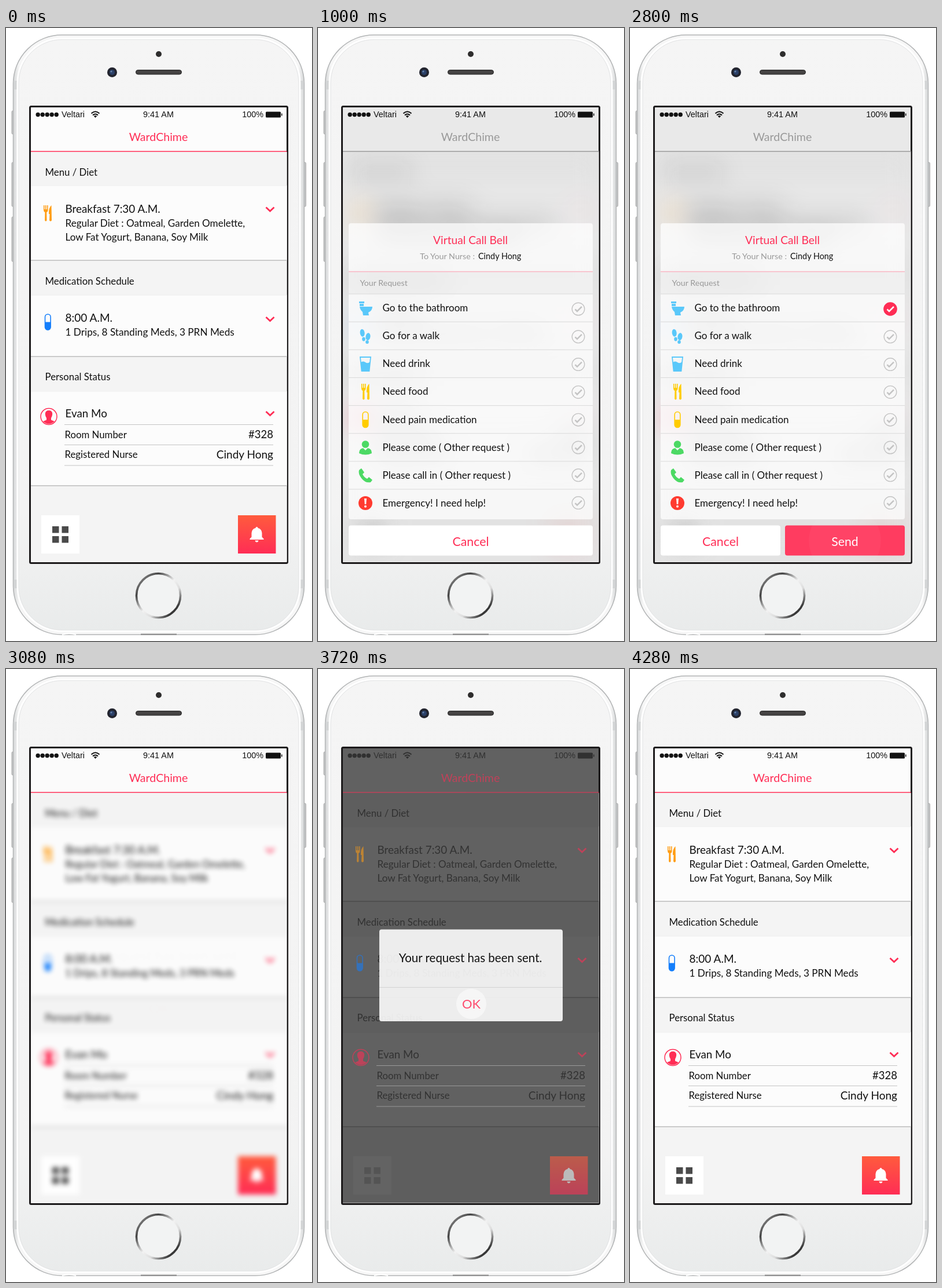
An HTML page that plays this animation: 529 px wide and 1058 px high, repeating every 4800 ms.

```html
<!DOCTYPE html>
<html lang="en">
<head>
<meta charset="utf-8">
<title>Call bell</title>
<style>
html, body { margin: 0; width: 100%; height: 100%; overflow: hidden; background: #fff; }
svg { display: block; width: 529px; height: 1058px; font-family: Lato, "Open Sans", sans-serif; }
.sys { font: 14.4px "Liberation Sans", Arial, sans-serif; }
.pink { color: #ff2d55; }
.line { fill: none; stroke: currentColor; }
</style>
</head>
<body>
<svg id="stage" viewBox="0 0 529 1058"></svg>
<script>
const NURSE = 'Cindy Hong';
const PINK = '#ff2d55', BLUE = '#5ac8fa', YELLOW = '#ffcc00', GREEN = '#4cd964';

const text = (x, y, size, str, fill = '#111', anchor = 'start') =>
  `<text x="${x}" y="${y}" font-size="${size}" fill="${fill}" text-anchor="${anchor}">${str}</text>`;
const rect = (x, y, w, h, fill, more = '') =>
  `<rect x="${x}" y="${y}" width="${w}" height="${h}" fill="${fill}" ${more}/>`;
const hline = (x1, x2, y, color, width = 1) =>
  `<path d="M${x1} ${y}H${x2}" stroke="${color}" stroke-width="${width}"/>`;
const place = (x, y, body, color = '#000') =>
  `<g transform="translate(${x} ${y})" color="${color}" fill="currentColor">${body}</g>`;

// Icons are centred on 0,0 and take the current colour.
const icon = {
  toilet: `<path d="M-11-12h9v3h-9zM-10-8h7v4h-7zM-10-3H12Q12 4 5 7l1 5H-4l-1-6Q-9 3-10-3z"/>`,
  feet: `<g><ellipse cx="-4.500" cy="-6.500" rx="4" ry="6.500" transform="rotate(-8)"/>
    <ellipse cx="-3" cy="5" rx="2.800" ry="3.400"/></g>
    <g><ellipse cx="4.500" cy="0" rx="4" ry="6.500" transform="rotate(8)"/>
    <ellipse cx="3" cy="10" rx="2.800" ry="3"/></g>`,
  glass: `<path class="line" stroke-width="1.800" d="M-9-12H9L6.500 12h-13z"/>
    <path d="M-8-3Q-4-6 0-3T8-4L6.500 12h-13z"/>`,
  cutlery: `<path d="M-7-14h1.600v7h1.400v-7h1.600v7h1.400v-7H.600v8Q.600-3-1.800-2L-1.500 12q-1.700 3-3.400 0l.300-14Q-7-3-7-6z"/>
    <path d="M6.500-14Q1.500-10 2 1h1.500L3 12q2 3 4 0z"/>`,
  pill: `<rect class="line" x="-4.800" y="-13.500" width="9.600" height="27" rx="4.800" stroke-width="1.600"/>
    <path d="M-5 0H5V9A5 5 0 0 1-5 9z"/>`,
  person: `<circle cy="-5.500" r="6.300"/><path d="M-11 10Q-11 2-4 1L0 5 4 1Q11 2 11 10 0 15-11 10z"/>`,
  phone: `<path d="M-11-9l4-3 5 7-3 3Q-2 4 3 6L6 3l6 5-3 4Q0 14-7 5-13-3-11-9z"/>`,
  alert: `<circle r="12"/><path d="M-2-8h4L1.200 2h-2.400z" fill="#fff"/><circle cy="5.800" r="2" fill="#fff"/>`,
  user: `<circle class="line" r="14" stroke-width="1.500"/>
    <path d="M0-10.500C8-10.500 7-2 4 2.500V6l6 2.500Q0 17-10 8.500L-4 6V2.500C-7-2-8-10.500 0-10.500z"/>`,
  bell: `<path d="M-12 9.500v-1.500l3-3V-2Q-8.500-9-2-10.500a2 2 0 0 1 4 0Q8.500-9 9 -2V5l3 3v1.500zM-3 11h6q-.500 3-3 3t-3-3z"/>`,
  chevron: `<path class="line" stroke-width="2.800" d="M-7-3.500L0 3 7-3.500"/>`,
  tick: `<path class="line" stroke-width="2.500" d="M-5.500.500L-2 4 6-4"/>`
};

const rows = [
  ['toilet', BLUE, 'Go to the bathroom'], ['feet', BLUE, 'Go for a walk'],
  ['glass', BLUE, 'Need drink'], ['cutlery', YELLOW, 'Need food'],
  ['pill', YELLOW, 'Need pain medication'], ['person', GREEN, 'Please come ( Other request )'],
  ['phone', GREEN, 'Please call in ( Other request )'], ['alert', '#ff3b30', 'Emergency! I need help!']
];

const sideKey = (x, y, h) => rect(x, y, 5, h, '#c9cbcc', 'rx="1.500" stroke="#999" stroke-width=".800"');
const phoneBody = `
  ${sideKey(10, 143, 40)}${sideKey(10, 232, 76)}${sideKey(10, 326, 77)}${sideKey(513.5, 232, 76)}
  ${rect(12.5, 12, 503, 1035, 'url(#rim)', 'rx="84" stroke="#b2b4b5" stroke-width="1.500"')}
  ${[91, 952].map(y => rect(13, y, 7, 15, '#d2d4d5') + rect(508, y, 7, 15, '#d2d4d5')).join('')}
  ${rect(20, 18, 488, 1023, 'url(#face)', 'rx="77" stroke="#fff" stroke-width="3"')}
  ${rect(22, 20, 484, 1019, 'none', 'rx="75" stroke="#e3e4e5"')}
  ${hline(233, 295, 1046.5, '#888', 2)}
  <path d="M97 1047Q109 1043 121 1047" fill="none" stroke="#fff" stroke-width="2"/>
  <circle cx="264" cy="45" r="5" fill="#2e2d2d"/>
  <circle cx="183.500" cy="76.500" r="8.500" fill="#22242e"/>
  <circle cx="183.500" cy="76.500" r="4.500" fill="#2b4068"/><circle cx="182" cy="75" r="1.600" fill="#6682a8"/>
  ${rect(224.5, 72.5, 79, 7.5, '#454343', 'rx="3.700" stroke="#222"')}
  <circle cx="263.500" cy="979.500" r="38" fill="#f2f3f3" stroke="url(#ring)" stroke-width="3.600"/>`;

const panels = rect(43, 213, 443, 710, '#f4f4f4')
  + [[272, 129], [461, 106], [627, 163]].map(([y, h]) =>
    rect(43, y, 443, h, '#fcfcfc') + hline(43, 486, y, '#eee') + hline(43, 486, y + h, '#cbcbcb', 2)).join('')
  + rect(61, 841, 66, 66, '#fff');

const content = `
  ${text(67.5, 255, 16.8, 'Menu / Diet')}
  ${text(67.5, 443, 16.8, 'Medication Schedule')}
  ${text(67.5, 607.5, 16.8, 'Personal Status')}
  ${text(102.5, 319, 18.9, 'Breakfast 7:30 A.M.')}
  ${text(102.5, 343, 17.1, 'Regular Diet : Oatmeal, Garden Omelette,')}
  ${text(102.5, 366.5, 17.1, 'Low Fat Yogurt, Banana, Soy Milk')}
  ${text(102.5, 507, 19, '8:00 A.M.')}
  ${text(102.5, 531, 17.2, '1 Drips, 8 Standing Meds, 3 PRN Meds')}
  ${text(102.5, 672, 18.8, 'Evan Mo')}
  ${text(101.5, 707.5, 16.8, 'Room Number')}${text(462, 707.5, 18.5, '#328', '#111', 'end')}
  ${text(101.5, 742, 16.8, 'Registered Nurse')}${text(462, 743, 19, NURSE, '#111', 'end')}
  ${[684.5, 719.5, 755].map(y => hline(101, 462, y, '#c4c4c4')).join('')}
  ${[313, 502.5, 665.5].map(y => place(456.5, y, icon.chevron, PINK)).join('')}
  ${place(72, 320, icon.cutlery, '#ff9d14')}
  ${place(72.3, 507.5, icon.pill, '#147efb')}
  ${place(74, 670.5, icon.user, PINK)}
  ${[80, 96.5].map(x => [860, 877].map(y => rect(x, y, 11.5, 11.5, '#4a4a4a')).join('')).join('')}
  <g id="bell">${rect(401, 841, 65.5, 66, 'url(#hot)')}${place(433.5, 873.5, icon.bell, '#fff')}</g>`;

const status = `<g class="sys" fill="#111">
  ${[0, 1, 2, 3, 4].map(i => `<circle cx="${55.2 + i * 8}" cy="149.500" r="3.700"/>`).join('')}
  <text x="96" y="154">Veltari</text>
  <g fill="none" stroke="#111" stroke-width="2"><path d="M147.500 147.500Q154.500 141 161.500 147.500M150 150.500Q154.500 146.500 159 150.500"/></g>
  <path d="M154.500 155l-2.700-3q2.700-2 5.400 0z"/>
  <text x="263.500" y="154" text-anchor="middle">9:41 AM</text>
  <text x="445" y="154" text-anchor="end">100%</text>
  ${rect(449, 144.500, 26, 10, '#111', 'rx="1.500"')}${rect(476, 147.5, 1.5, 4, '#111')}</g>`;

const check = (color, body) => place(450, 0, body, color);
const sheet = `
  ${rect(53, 337, 422, 511, '#fff', 'rx="4" fill-opacity=".72"')}
  ${text(263.5, 372.5, 19.2, 'Virtual Call Bell', PINK, 'middle')}
  ${text(271, 398.5, 14.3, 'To Your Nurse :', '#999', 'end')}
  ${text(277, 398.5, 14.4, NURSE)}
  ${rect(53, 421, 422, 38, '#000', 'fill-opacity=".030"')}
  ${hline(53, 475, 420.5, '#f9b5c2', 1.3)}
  ${text(72.5, 444.5, 14.2, 'Your Request', '#999')}
  ${rows.map(([name, color, label], i) => `
    ${hline(53, 475, 459 + i * 48.15, '#d9d9d9')}
    ${place(82, 484 + i * 48, icon[name], color)}
    ${text(111.5, 489 + i * 48.15, 17, label)}
    <g transform="translate(0 ${485 + i * 47.8})">${check('#c4c4c4',
      `<circle class="line" r="10.800" stroke-width="1.400"/>${icon.tick}`)}</g>`).join('')}
  <g transform="translate(450 485)"><g id="picked" color="#fff">
    <circle r="11.800" fill="${PINK}"/>${icon.tick}</g></g>
  <rect id="cancel" x="53" y="858.500" height="52" rx="4" fill="#fff"/>
  <text id="cancelText" y="893.500" font-size="21.300" fill="${PINK}" text-anchor="middle">Cancel</text>
  <g id="send">${rect(268, 858.5, 207, 52, PINK, 'rx="4" id="sendFace"')}
    ${text(371.5, 893.5, 21.3, 'Send', '#fff', 'middle')}</g>`;

const popup = `
  ${rect(106, 449.5, 317, 158.5, '#fff', 'rx="4" fill-opacity=".890"')}
  ${hline(106, 423, 549.5, '#d2d2d2')}
  ${text(263.5, 506, 20.5, 'Your request has been sent.', '#111', 'middle')}`;

const gradient = (id, dir, stops) => `<linearGradient id="${id}" ${dir}>${stops.map(([at, color]) =>
  `<stop offset="${at}" stop-color="${color}"/>`).join('')}</linearGradient>`;
const down = 'x2="0" y2="1"';

document.getElementById('stage').innerHTML = `
  <defs>
    ${gradient('rim', '', [[0, '#d5d7d8'], [.02, '#f6f6f6'], [.98, '#f6f6f6'], [1, '#d5d7d8']])}
    ${gradient('face', down, [[0, '#f5f5f5'], [.8, '#f3f3f3'], [1, '#e9ebeb']])}
    ${gradient('hot', down, [[0, '#ff5b3d'], [1, PINK]])}
    ${gradient('ring', 'y2="1"', [[0, '#aaa'], [.25, '#444'], [.5, '#f2f2f2'], [.65, '#ddd'], [.85, '#333'], [1, '#999']])}
    <clipPath id="glass"><rect x="43" y="137" width="442.500" height="784.500"/></clipPath>
    <clipPath id="below"><rect x="43" y="214" width="442.500" height="708"/></clipPath>
  </defs>
  ${phoneBody}
  ${rect(41.5, 135.5, 445, 788, '#fcfcfc', 'stroke="#1c1a1b" stroke-width="3" rx="2"')}
  <g clip-path="url(#glass)">
    <g clip-path="url(#below)">${rect(43, 213, 443, 710, '#f6f6f6')}<g id="panels">${panels}</g></g>
    ${rect(43, 137, 443, 786, '#000', 'id="shade"')}
    <g clip-path="url(#below)"><g id="content">${content}</g></g>
    <g id="top">${status}<g id="title">
      ${text(263.5, 195, 19.6, 'WardChime', 'currentColor', 'middle')}${hline(43, 486, 213, 'currentColor', 1.6)}</g></g>
    <g id="sheet">${sheet}</g>
    <g id="popup">${popup}</g>
    <circle id="ripple" fill="#fff"/>
    <g id="ok">${text(265, 586, 21.9, 'OK', PINK, 'middle')}</g>
  </g>`;

const el = id => document.getElementById(id);
const part = (t, start, span) => Math.min(1, Math.max(0, (t - start) / span));
const out = (t, start, span, power = 4) => 1 - (1 - part(t, start, span)) ** power;

// start time, x, y
const taps = [[280, 433.5, 874], [1520, 450, 485], [2480, 371.5, 885], [3690, 265, 578]];

function draw(t) {
  const open = out(t, 520, 340, 3), close = part(t, 2860, 220) ** 2;
  const up = open * (1 - close);
  const alert = out(t, 3080, 440), gone = part(t, 3960, 260);
  const dim = alert * (1 - gone);

  const blur = 22 * (open - out(t, 2840, 700));
  for (const id of ['panels', 'content']) el(id).style.filter = blur > .05 ? `blur(${blur}px)` : 'none';
  el('shade').style.opacity = .075 * up + .61 * dim;
  el('content').style.opacity = 1 - .42 * dim;
  el('top').style.opacity = 1 - .4 * dim;
  el('bell').style.opacity = 1 - .9 * up;
  el('title').style.color = `color-mix(in srgb, #999 ${up * 100}%, ${PINK})`;

  el('sheet').setAttribute('transform', `translate(0 ${(1 - up) * 600})`);
  el('picked').setAttribute('transform', `scale(${out(t, 1600, 200, 3)})`);
  const split = out(t, 1680, 320, 3), width = 422 - 215 * split;
  el('cancel').setAttribute('width', width);
  el('cancelText').setAttribute('x', 53 + width / 2);
  el('send').setAttribute('transform', `translate(${218 * (1 - split)} 0)`);
  el('sendFace').setAttribute('fill', t >= 2560 && t < 3100 ? '#ff3c60' : PINK);

  const scale = 1.15 - .15 * alert;
  for (const id of ['popup', 'ok']) {
    el(id).setAttribute('transform', `translate(264.5 528.7) scale(${scale}) translate(-264.5 -528.7)`);
    el(id).style.opacity = dim * (id === 'ok' ? .85 : 1);
    el(id).style.filter = alert > 0 && alert < .98 ? `blur(${2.5 * (1 - alert)}px)` : 'none';
  }

  const tap = taps.find(([start]) => t >= start && t < start + 420);
  el('ripple').style.opacity = 0;
  if (tap) {
    const [start, x, y] = tap, p = part(t, start, 420);
    const ring = { cx: x, cy: y, r: 26 + 39 * out(t, start + 40, 380, 2) };
    for (const key in ring) el('ripple').setAttribute(key, ring[key]);
    el('ripple').style.opacity = .6 * (1 - p) ** 2;
  }
}

function tick(now) {
  draw(now % 4800);
  requestAnimationFrame(tick);
}
draw(0);
requestAnimationFrame(tick);
</script>
</body>
</html>
```
